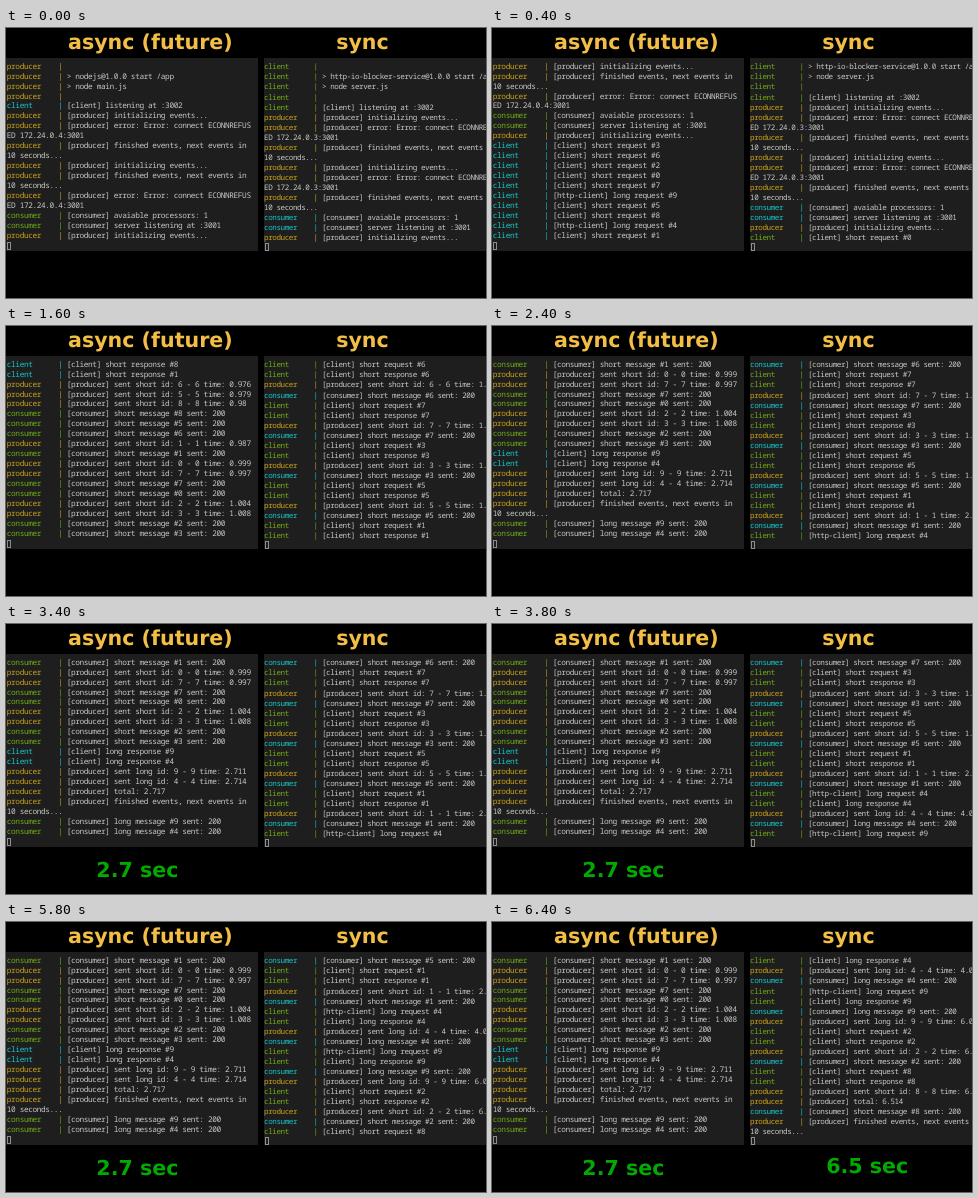
An HTML page for the animation above (8 s loop, 480 by 270 pixels).

```html
<!DOCTYPE html>
<html lang="en">
<head>
<meta charset="utf-8">
<title>async and sync logs</title>
<style>
html, body { margin: 0; width: 480px; height: 270px; overflow: hidden; background: #000; }
body { position: relative; text-rendering: geometricPrecision; }
body > * { position: absolute; margin: 0; }
.big { font: bold 20.6px/0 "DejaVu Sans", sans-serif; color: #f3be45; white-space: pre; }
.time { color: #00aa00; visibility: hidden; }
.term { top: 30px; overflow: hidden; box-sizing: border-box; background: #1e1e1e; color: #c8c8c6;
  font-family: "Noto Sans Mono", "DejaVu Sans Mono", monospace; white-space: pre; }
#async { left: 0; width: 252px; height: 193px; padding: 4.6px 0 0 .8px; font-size: 7.8px; letter-spacing: -.4px; line-height: 9.97px; }
#sync { left: 258px; width: 222px; height: 193px; padding: 4.4px 0 0 .1px; font-size: 7.6px; letter-spacing: -.43px; line-height: 10.05px; }
.cursor { width: 2px; height: 6px; border: 1px solid #8e8e8c; box-sizing: content-box; }
</style>
</head>
<body>
<div class="big" style="left:62px;top:13.8px">async (future)</div>
<div class="big" style="left:330.2px;top:13.8px">sync</div>
<pre class="term" id="async"></pre>
<pre class="term" id="sync"></pre>
<div class="cursor" style="left:1px;top:214px"></div>
<div class="cursor" style="left:259px;top:215px"></div>
<div class="big time" data-at="2600" style="left:90.3px;top:245.5px">2.7 sec</div>
<div class="big time" data-at="6400" style="left:334.2px;top:243.5px">6.5 sec</div>
<script>
const LOOP = 8000, ROWS = 18, WRAP = 43;
const YELLOW = '#cba318', CYAN = '#14c8cc', GREEN = '#70ac14';

function makeLog(id, colors) {
  const rows = [];
  const raw = (at, who, text) => {
    rows.push({ at, who, text: text.slice(0, WRAP) });
    if (text.length > WRAP) rows.push({ at, text: text.slice(WRAP) });
  };
  const say = (at, who, text, tag = who) => raw(at, who, `[${tag}] ${text}`);
  return {
    rows, colors, el: document.getElementById(id), shown: -1,
    boot(who, pkg, script) {
      ['', `> ${pkg}@1.0.0 start /app`, `> node ${script}`, ''].forEach(s => raw(0, who, s));
      say(0, 'client', 'listening at :3002');
    },
    init: () => say(0, 'producer', 'initializing events...'),
    error: ip => say(0, 'producer', `error: Error: connect ECONNREFUSED ${ip}:3001`),
    finish: at => say(at, 'producer', 'finished events, next events in 10 seconds...'),
    consumerUp() {
      say(0, 'consumer', 'avaiable processors: 1');
      say(0, 'consumer', 'server listening at :3001');
    },
    request: (at, n, kind = 'short') =>
      say(at, 'client', `${kind} request #${n}`, kind === 'long' ? 'http-client' : 'client'),
    response: (at, n, kind = 'short') => say(at, 'client', `${kind} response #${n}`),
    sent: (at, n, time, kind = 'short') =>
      say(at, 'producer', `sent ${kind} id: ${n} - ${n} time: ${time}`),
    message: (at, n, kind = 'short') => say(at, 'consumer', `${kind} message #${n} sent: 200`),
    total: (at, time) => say(at, 'producer', `total: ${time}`),
  };
}

function asyncLog() {
  const a = makeLog('async', { producer: YELLOW, client: CYAN, consumer: GREEN });
  const ip = '172.24.0.4';
  a.boot('producer', 'nodejs', 'main.js');
  a.init(); a.error(ip); a.finish(0);
  a.init(); a.finish(0); a.error(ip);
  a.consumerUp(); a.init();

  for (const n of [3, 6, 2, 0, 7, 9, 5, 8, 4, 1]) a.request(400, n, n === 9 || n === 4 ? 'long' : 'short');

  const t = 600;
  for (const n of [3, 6, 2, 0, 7, 5, 8, 1]) a.response(t, n);
  a.sent(t, 6, '0.976'); a.sent(t, 5, '0.979'); a.sent(t, 8, '0.98');
  for (const n of [8, 5, 6]) a.message(t, n);
  a.sent(t, 1, '0.987'); a.message(t, 1);
  a.sent(t, 0, '0.999'); a.sent(t, 7, '0.997');
  a.message(t, 7); a.message(t, 0);
  a.sent(t, 2, '1.004'); a.sent(t, 3, '1.008');
  a.message(t, 2); a.message(t, 3);

  const end = 2400;
  a.response(end, 9, 'long'); a.response(end, 4, 'long');
  a.sent(end, 9, '2.711', 'long'); a.sent(end, 4, '2.714', 'long');
  a.total(end, '2.717'); a.finish(end);
  a.message(end, 9, 'long'); a.message(end, 4, 'long');
  return a;
}

function syncLog() {
  const s = makeLog('sync', { producer: YELLOW, client: GREEN, consumer: CYAN });
  const ip = '172.24.0.3';
  s.boot('client', 'http-io-blocker-service', 'server.js');
  s.init(); s.error(ip); s.finish(0);
  s.init(); s.error(ip); s.finish(0);
  s.consumerUp(); s.init();

  // Each call blocks the next one.
  let at = 400;
  for (const [n, time] of [[0, '1.012'], [6, '1.218'], [7, '1.424'], [3, '1.631'], [5, '1.837']]) {
    s.request(at, n);
    at += 200;
    s.response(at, n); s.sent(at, n, time); s.message(at, n);
  }
  s.request(1400, 1); s.response(1600, 1);
  s.sent(1800, 1, '2.043'); s.message(1800, 1);

  s.request(1800, 4, 'long'); s.response(3600, 4, 'long');
  s.sent(3600, 4, '4.051', 'long'); s.message(3600, 4, 'long');
  s.request(3600, 9, 'long'); s.response(5600, 9, 'long');
  s.message(5600, 9, 'long'); s.sent(5600, 9, '6.058', 'long');

  s.request(5600, 2); s.response(5800, 2);
  s.sent(5800, 2, '6.265'); s.message(5800, 2);
  s.request(5800, 8); s.response(6000, 8);
  s.sent(6200, 8, '6.512'); s.total(6200, '6.514');
  s.message(6200, 8); s.finish(6200);
  return s;
}

function drawRow({ who, text }, colors) {
  const row = document.createElement('div');
  if (who) {
    const label = document.createElement('span');
    label.textContent = who.padEnd(12) + '| ';
    label.style.color = colors[who];
    row.append(label);
  }
  row.append(text);
  return row;
}

const logs = [asyncLog(), syncLog()];
const times = document.querySelectorAll('.time');

function draw(now) {
  const t = now % LOOP;
  for (const log of logs) {
    const past = log.rows.filter(r => r.at <= t);
    if (past.length === log.shown) continue;
    log.shown = past.length;
    log.el.replaceChildren(...past.slice(-ROWS).map(r => drawRow(r, log.colors)));
  }
  for (const el of times) el.style.visibility = t >= el.dataset.at ? 'visible' : 'hidden';
  requestAnimationFrame(draw);
}
draw(0);
</script>
</body>
</html>
```
